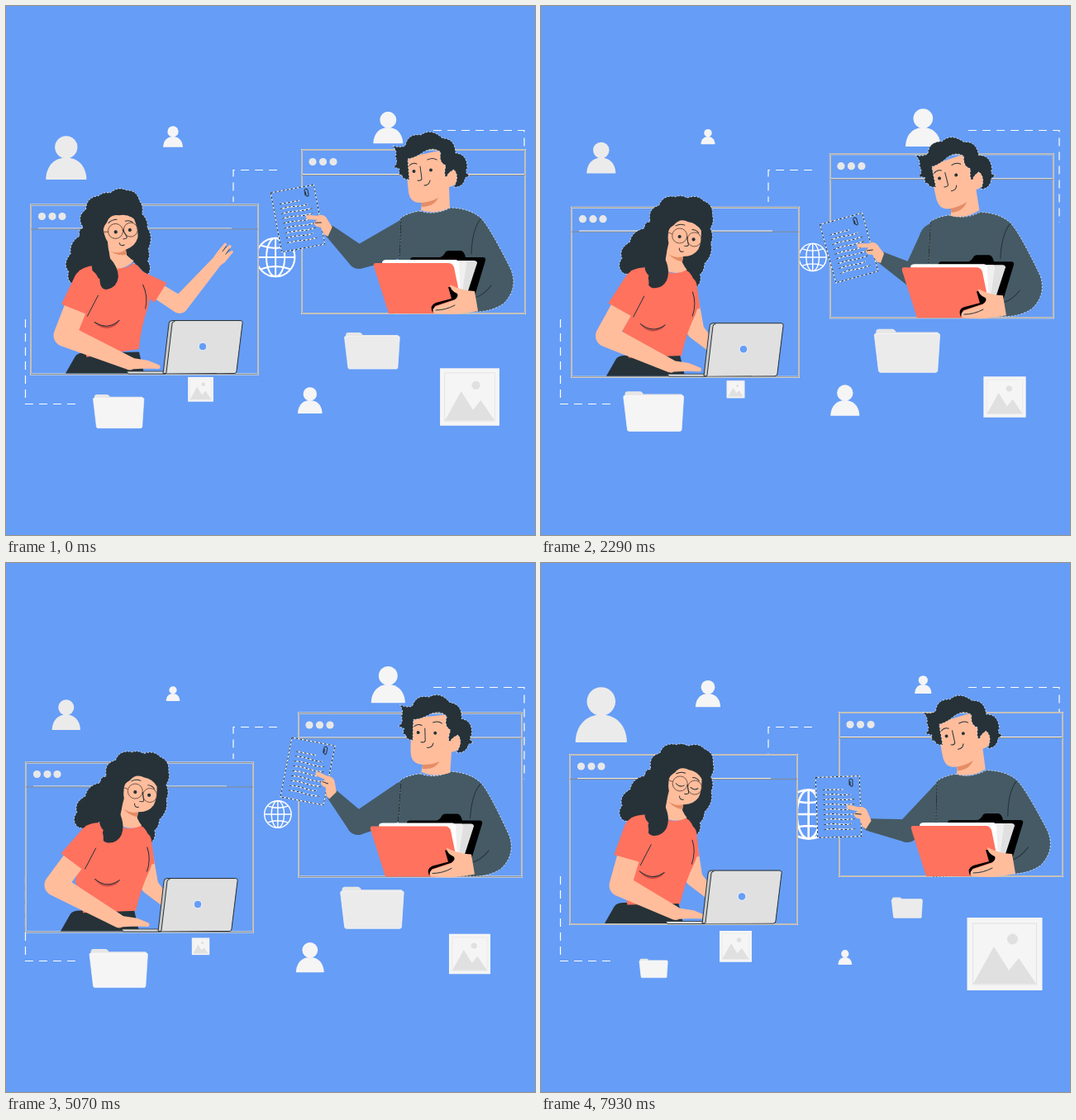
Recreate the animation shown at these times as an HTML page. Size 640x640 px, loop 8 s.

```html
<!DOCTYPE html>
<html lang="en">
<head>
<meta charset="utf-8">
<title>Remote teamwork</title>
<style>
html, body { margin: 0; width: 100%; height: 100%; overflow: hidden; background: #669df6; }
svg { display: block; width: 100vw; height: 100vh; }
.line { fill: none; stroke: #263238; stroke-width: 1; stroke-linecap: round; stroke-linejoin: round; }
.halo { stroke: #fff; stroke-width: .7; stroke-dasharray: 2 2; }
.dash { fill: none; stroke: #fff; stroke-width: 1.2; stroke-dasharray: 10 7; }
.skin { fill: #ffbd9c; }
.hair { fill: #263238; }
.shirt { fill: #ff725e; }
.knit { fill: #455a64; }
.pane { fill: #669df6; stroke: #f4efe6; stroke-width: 2; }
.edge { fill: none; stroke: #8b8882; stroke-width: .9; }
.rule { stroke: #f4efe6; stroke-width: 1.2; }
</style>
</head>
<body>
<svg viewBox="0 0 640 640">
  <defs>
    <g id="user"><circle cy="-16" r="17.3"/><path d="M-31 33.5V30C-29 11-17 0 0 0S29 11 31 30V33.5Z"/></g>
    <g id="photo">
      <path fill="#f5f5f5" d="M-45.5-44h91v88h-91z"/>
      <path fill="none" stroke="#e2e2e2" d="M-38.5-37h77v74h-77z"/>
      <path fill="#e0e0e0" d="M-38 36L-13-9 5 20 17 5 38 36Z"/><circle fill="#e0e0e0" cx="9.5" cy="-18" r="6.5"/>
    </g>
    <g id="folder">
      <path d="M-40-24Q-40-28-36-28H-19Q-16-28-14-24H39Q41-24 41-20L38 22H-37Z" fill="#e6e6e6"/>
      <path d="M-40.5-22H41Q42.5-22 42.5-20L39.5 26Q39 28 37 28H-34Q-36 28-36.5 26L-42-20Q-42-22-40.5-22Z" stroke="#fafafa" stroke-width=".8"/>
    </g>
  </defs>

  <rect width="640" height="640" fill="#669df6"/>
  <path class="dash" d="M517 150.5H627V262"/>
  <path class="dash" d="M328 198.5H275V237"/>
  <path class="dash" d="M23.5 379V481.5H88"/>
  <g id="icons"></g>
  <g id="globe" fill="none" stroke="#fff" stroke-width="2.6">
    <circle r="29.5"/><ellipse rx="14" ry="29.5"/>
    <path d="M0-29V29M-29 0H29M-22-18Q0-10 22-18M-22 18Q0 10 22 18"/>
  </g>

  <g id="left">
    <path class="pane" d="M35 242H310V447H35Z"/>
    <path class="edge" d="M35 242H310V447H35Z"/>
    <path class="rule" d="M44 270.5H278"/><path class="edge" d="M35 271.5H310"/>
    <g fill="#e8e8e8"><circle cx="48.5" cy="256" r="4.6"/><circle cx="61" cy="256" r="4.6"/><circle cx="73" cy="256" r="4.6"/></g>
    <path class="hair" d="M77 446L89 425Q92 421 100 421L166 420 172 446Z"/>
    <g class="head">
      <path class="hair halo" d="M138 240Q143 226 158 229 165 226 172 230 184 225 192 233 204 237 203 250 206 258 201 266 206 276 202 284 206 297 195 309 195 318 190 322 193 333 184 339 176 325 172 316L150 316 126 312Q112 328 97 323 88 315 95 305 90 294 104 285 106 272 121 268 121 260 128 260 124 244 138 240Z"/>
    </g>
    <path class="skin" id="armR"/>
    <g id="handR">
      <path class="skin" d="M-2-7L14-9 31-10Q35-8 31-6L22-4 35-3Q37 0 33 1L21 2 31 5Q32 8 28 8L10 9-1 7Z"/>
      <path class="line" stroke-width=".7" d="M20-4L29-5M20 2L30 1"/>
    </g>
    <path class="shirt" id="sleeveR"/>
    <g class="torso">
      <path class="shirt" d="M106 319Q120 311 146 317 158 326 172 317 181 321 185 337 191 355 185 370 173 395 168 421L104 424Q101 398 94 386 102 365 99 340Z"/>
      <path d="M118 383Q133 396 148 384 145 391 133 392 123 391 118 383Z" fill="#c44b42"/>
      <path class="line" stroke-width=".8" d="M118 383Q133 395 148 384M181 344Q186 358 181 373"/>
    </g>
    <g class="head">
      <path class="skin" d="M148 282Q148 268 157 263 164 254 174 259 184 260 190 269 191 284 187 292 181 301 169 301L168 308Q171 314 174 317 160 325 146 317L149 296Z"/>
      <path fill="#e58d66" d="M151 298Q160 304 169 301L168 307Q158 306 151 298Z"/>
      <path class="hair" d="M142 300Q138 270 144 256L160 250Q160 262 151 267 149 279 151 285 149 295 147 304 154 318 150 330 145 341 133 340 124 338 128 325 120 318 124 306Z"/>
      <path class="line" stroke-width="1.7" d="M159 264Q164 261 170 263M179 268Q184 268 187 272"/>
      <g fill="none" stroke="#5b4139" stroke-width=".8"><circle cx="164" cy="276" r="9"/><circle cx="182" cy="280" r="8.500"/><path d="M155 274L149 272M173 277L174 278"/></g>
      <g id="open" class="hair"><circle cx="164" cy="277" r="2.1"/><circle cx="181" cy="280" r="2.1"/></g>
      <path id="shut" class="line" d="M159 276Q164 281 169 278M177 280Q181 284 186 281"/>
      <path class="line" stroke-width=".9" d="M173 277L175 287Q174 289 170 288M164 291Q164 296 169 295"/>
    </g>
    <path class="skin" id="armL"/>
    <path class="shirt" id="sleeveL"/>
    <path class="line" id="cuff" stroke-width=".8"/>
    <path fill="#e0e0e0" stroke="#263238" stroke-width=".8" d="M151 443.5H198V446.5H153Z"/>
    <path fill="#c9c9c9" stroke="#263238" d="M195 446L202 386Q202 382 206 382H288Q292 382 291 386L284 443Q284 446 281 446Z"/>
    <path fill="#e0e0e0" d="M199 446L206 386Q206 383 209 383H288Q291 383 290 386L283 443Q283 445.5 280 445.5Z"/>
    <path class="line" stroke-width=".8" d="M199 445L206 386Q206 383 209 383"/>
    <circle cx="243" cy="413.5" r="4.8" fill="#669df6" stroke="#fff" stroke-width=".8"/>
  </g>

  <g class="right">
    <path class="pane" d="M358 174H628V372H358Z"/>
    <path class="edge" d="M358 174H628V372H358Z"/>
    <path class="rule" d="M359 203.7H627"/><path class="edge" d="M358 204.5H628"/>
    <g fill="#e8e8e8"><circle cx="371" cy="188.5" r="4.6"/><circle cx="383.5" cy="188.5" r="4.6"/><circle cx="396" cy="188.5" r="4.6"/></g>
  </g>
  <path class="knit" id="armM"/>
  <g id="doc">
    <path fill="#669df6" stroke="#fff" d="M-26.5-36.5h53v73h-53z"/>
    <path class="line" stroke-dasharray="2 3" d="M-26.5-36.5h53v73h-53z"/>
    <path id="text" fill="none" stroke="#fff" stroke-width="1.3"/>
    <path id="ink" class="line" stroke-dasharray="2 3"/>
    <path class="line" d="M14-26V-32Q16-35 18-32V-25Q16-23 15-26V-30" stroke-width=".6"/>
    <path class="skin" d="M39 18L34 5Q31 0 24 1L12-2Q8 0 11 3L23 6 18 9Q19 15 25 15L28 25 32 28Z"/>
    <path class="line" stroke-width=".6" d="M20 9L27 10"/>
  </g>
  <g class="right">
    <g id="body">
      <path class="knit halo" d="M501 248Q518 254 538 244 562 245 575 257 586 269 611 319 620 342 602 360 588 370 566 370L470 372 476 308 478 256Q487 250 501 248Z"/>
      <path class="line" stroke-width=".8" d="M574 258Q564 270 563 300M478 257L476 307M567 353Q578 350 587 338"/>
      <g id="headM">
        <path class="skin" d="M487 183L524 175 534 198Q546 194 547 207 545 218 536 219L537 244Q520 253 502 247L503 238Q489 239 487 225 484 205 487 183Z"/>
        <path fill="#e58d66" d="M503 238Q515 237 523 232 518 243 503 243Z"/>
        <path class="hair halo" d="M468 169Q476 172 483 169 486 154 502 156 514 147 528 160 543 160 544 178 558 179 558 196 554 203 562 205 554 207 555 211 551 220 542 219 549 206 542 198 535 201 533 207 529 206 532 193 523 189 526 177 516 169 503 178 494 184 486 185L488 210Q479 210 479 204 474 206 476 197L469 195Q475 190 471 182 474 177 468 169Z"/>
        <path class="line" stroke-width="1.8" d="M488 193Q492 189 497 191M510 186Q516 183 521 186"/>
        <g class="hair"><circle cx="493.5" cy="200" r="2"/><circle cx="514" cy="198.5" r="2"/></g>
        <path class="line" d="M501 194L503 209Q502 212 498 211M506 217Q512 217 513 211"/>
      </g>
    </g>
    <path d="M489 307Q489 304 493 304H524Q528 304 531 299 532 296 536 296H550Q554 296 556 304H577Q581 304 580 308L567 351 500 345Z"/>
    <path fill="#e0e0e0" d="M460 308H566Q570 308 570 311L556 354 480 350Z"/>
    <path fill="#f0f0f0" d="M456 308H554Q558 308 557 312L551 354 480 350Z"/>
    <path fill="#fff" d="M455 310Q456 307 460 307H544Q549 308 548 313L550 352 470 350Z"/>
    <path class="shirt" d="M447 311H535Q540 311 542 316L549 350 540 372H463L445 315Q444 311 447 311Z"/>
    <path d="M535 340Q547 339 548 349 546 355 540 356L519 363 516 371Q512 362 520 359L539 354Z"/>
    <path class="skin" d="M537 337Q550 344 567 345L571 369Q553 372 540 373L518 372Q514 366 521 363L542 356Q548 352 546 348 537 344 537 337Z"/>
    <path class="line" stroke-width=".6" d="M520 368Q532 368 543 362"/>
  </g>
</svg>
<script>
const LOOP = 8000;
const times = [0, 1430, 3070, 4210, 5070, 6070, 7930];
const tracks = {
  lx: [30, 35, 37, 29, 24, 26, 35],
  ly: [445.5, 447, 450, 449.5, 446.5, 442, 437],
  rx: [358, 353, 348, 350, 354, 358.5, 361],
  ry: [174, 177, 181, 183, 181.5, 179.5, 181],
  grow: [.79, .675, .473, .453, .55, .735, 1],
  shrink: [.79, .87, .99, 1, .905, .71, .445],
  lean: [-6, -.5, .3, .2, .5, .8, 1.2],
  nod: [-12, 0, 1, 2, 2.5, 2.5, 1],
  elbowX: [76, 78, 76, 71, 71, 78, 96],
  elbowY: [400, 397, 397, 391, 390, 394, 400],
  wristX: [155, 155, 155, 149, 148, 159, 163],
  docX: [353, 370, 372, 365, 365, 368, 360],
  docY: [257, 286, 292, 271, 252, 244, 295],
  docA: [-10.5, -14, -14, 1, 11, 11, -2],
  manX: [427, 450, 447, 436, 426, 428, 443],
  manY: [304, 322, 328, 326, 315, 308, 324],
  manLean: [0, .5, 1, 2, 2, 0, -1],
  manNod: [0, -6, -7, 0, 4, 5.5, -4]
};
const $ = id => document.getElementById(id);
const all = c => document.querySelectorAll('.' + c);
const set = (el, t) => el.setAttribute('transform', t);
const draw = (id, d) => $(id).setAttribute('d', d);
const mix = (a, b, k) => a + (b - a) * k;
const smooth = k => (k = Math.min(1, Math.max(0, k)), k * k * (3 - 2 * k));

function slope(v, i) {
  const a = Math.max(0, i - 1), b = Math.min(times.length - 1, i + 1);
  return (v[b] - v[a]) / (times[b] - times[a]);
}
// Cubic Hermite through the key poses
function sample(v, t) {
  let i = 0;
  while (i < times.length - 2 && t > times[i + 1]) i++;
  const h = times[i + 1] - times[i], k = Math.min(1.04, (t - times[i]) / h), q = 1 - k;
  return (1 + 2 * k) * q * q * v[i] + k * q * q * h * slope(v, i)
    + k * k * (3 - 2 * k) * v[i + 1] - k * k * q * h * slope(v, i + 1);
}
function turn(x, y, deg, cx, cy) {
  const a = deg * Math.PI / 180, c = Math.cos(a), s = Math.sin(a);
  x -= cx; y -= cy;
  return [cx + x * c - y * s, cy + x * s + y * c];
}
function quad([ax, ay, ar], [bx, by, br]) {
  const l = Math.hypot(bx - ax, by - ay) || 1, nx = (ay - by) / l, ny = (bx - ax) / l;
  return `M${ax + nx * ar} ${ay + ny * ar}L${bx + nx * br} ${by + ny * br} ${bx - nx * br} ${by - ny * br} ${ax - nx * ar} ${ay - ny * ar}Z`;
}
const disc = ([x, y, r]) => `M${x - r} ${y}a${r} ${r} 0 1 0 ${2 * r} 0a${r} ${r} 0 1 0 ${-2 * r} 0Z`;
// Tapered limb through [x, y, radius] joints
const limb = (...p) => p.map((a, i) => disc(a) + (i ? quad(p[i - 1], a) : '')).join('');
function sleeve(s, e, k, r0, r1) {
  const a = [...s, r0], b = [mix(s[0], e[0], k), mix(s[1], e[1], k), r1];
  return disc(a) + quad(a, b);
}

const icons = [
  ['user', 72.8, 183.5, 1, 'grow', '#ebebeb'],
  ['user', 202, 158, .484, 'grow', '#f5f5f5'],
  ['user', 462.3, 147, .73, 'shrink', '#f5f5f5'],
  ['user', 367.8, 477, .6, 'shrink', '#f5f5f5'],
  ['photo', 561, 473, 1, 'grow', ''],
  ['photo', 235.5, 463.8, .428, 'grow', ''],
  ['folder', 136, 490.3, .92, 'shrink', '#f5f5f5'],
  ['folder', 442.7, 417, 1, 'shrink', '#ebebeb']
].map(([ref, x, y, size, mode, fill]) => {
  const el = document.createElementNS('http://www.w3.org/2000/svg', 'use');
  el.setAttribute('href', '#' + ref);
  if (fill) el.setAttribute('fill', fill);
  $('icons').append(el);
  return { el, x, y, size, mode };
});

let rows = '';
for (let i = 0; i < 8; i++) rows += `M-18 ${-15 + i * 6}q9 -1.5 18 0t${i % 3 ? 19 : 15} 0`;
rows += 'M-18-21H6';
draw('text', rows);
draw('ink', rows);

function render(t) {
  const p = {};
  for (const k in tracks) p[k] = sample(tracks[k], t);

  for (const i of icons) set(i.el, `translate(${i.x} ${i.y}) scale(${i.size * p[i.mode]})`);
  set($('globe'), `translate(${330 - 11.5 * (p.grow - .45)} 304) scale(${p.grow})`);

  set($('left'), `translate(${p.lx - 35} ${p.ly - 447})`);
  const wave = 1 - smooth((t - 100) / 1100);
  const lean = mix(sample(tracks.lean, Math.max(t, 1430)), -6, wave);
  const nod = mix(sample(tracks.nod, Math.max(t, 1430)), -12, wave);
  const torso = `rotate(${lean} 125 440)`;
  all('torso').forEach(el => set(el, torso));
  all('head').forEach(el => set(el, `${torso} rotate(${nod} 160 320)`));

  const sl = turn(113, 333, lean, 125, 440), el = [p.elbowX, p.elbowY];
  draw('armL', limb([...sl, 14], [...el, 13.5], [p.wristX, 434, 8]) +
    limb([p.wristX, 434, 7], [p.wristX + 20, 435, 5], [p.wristX + 34, 438, 2.5]));
  draw('sleeveL', sleeve(sl, el, .52, 15, 17.5));
  const cx = mix(sl[0], el[0], .52), cy = mix(sl[1], el[1], .52);
  draw('cuff', `M${cx + 15} ${cy + 8}L${cx + 28} ${cy - 17}`);

  const sr = turn(176, 336, lean, 125, 440);
  const er = [mix(185, 215, wave), mix(391, 363, wave)];
  const wr = [mix(206, 259, wave), mix(412, 312, wave)];
  draw('armR', limb([...sr, 9], [...er, 10.5], [...wr, 6.5]));
  draw('sleeveR', sleeve(sr, er, .54, 10, mix(9.5, 14, wave)));
  const aim = Math.atan2(wr[1] - er[1], wr[0] - er[0]) * 180 / Math.PI;
  set($('handR'), `translate(${wr[0]} ${wr[1]}) rotate(${aim + 2}) scale(.78 .85)`);

  const blink = t > 7840;
  $('open').style.opacity = blink ? 0 : 1;
  $('shut').style.opacity = blink ? 1 : 0;

  const dx = p.rx - 358, dy = p.ry - 174;
  all('right').forEach(el => set(el, `translate(${dx} ${dy})`));
  set($('body'), `rotate(${p.manLean} 520 372)`);
  set($('headM'), `rotate(${p.manNod} 519 244)`);
  set($('doc'), `translate(${p.docX} ${p.docY}) rotate(${p.docA})`);
  const w = turn(p.docX + 36, p.docY + 23, p.docA, p.docX, p.docY);
  draw('armM', limb([488 + dx, 279 + dy, 23], [p.manX, p.manY, 14], [...w, 7.5]));
}

const start = performance.now();
function tick() {
  render((performance.now() - start) % LOOP);
  requestAnimationFrame(tick);
}
render(0);
requestAnimationFrame(tick);
</script>
</body>
</html>
```
